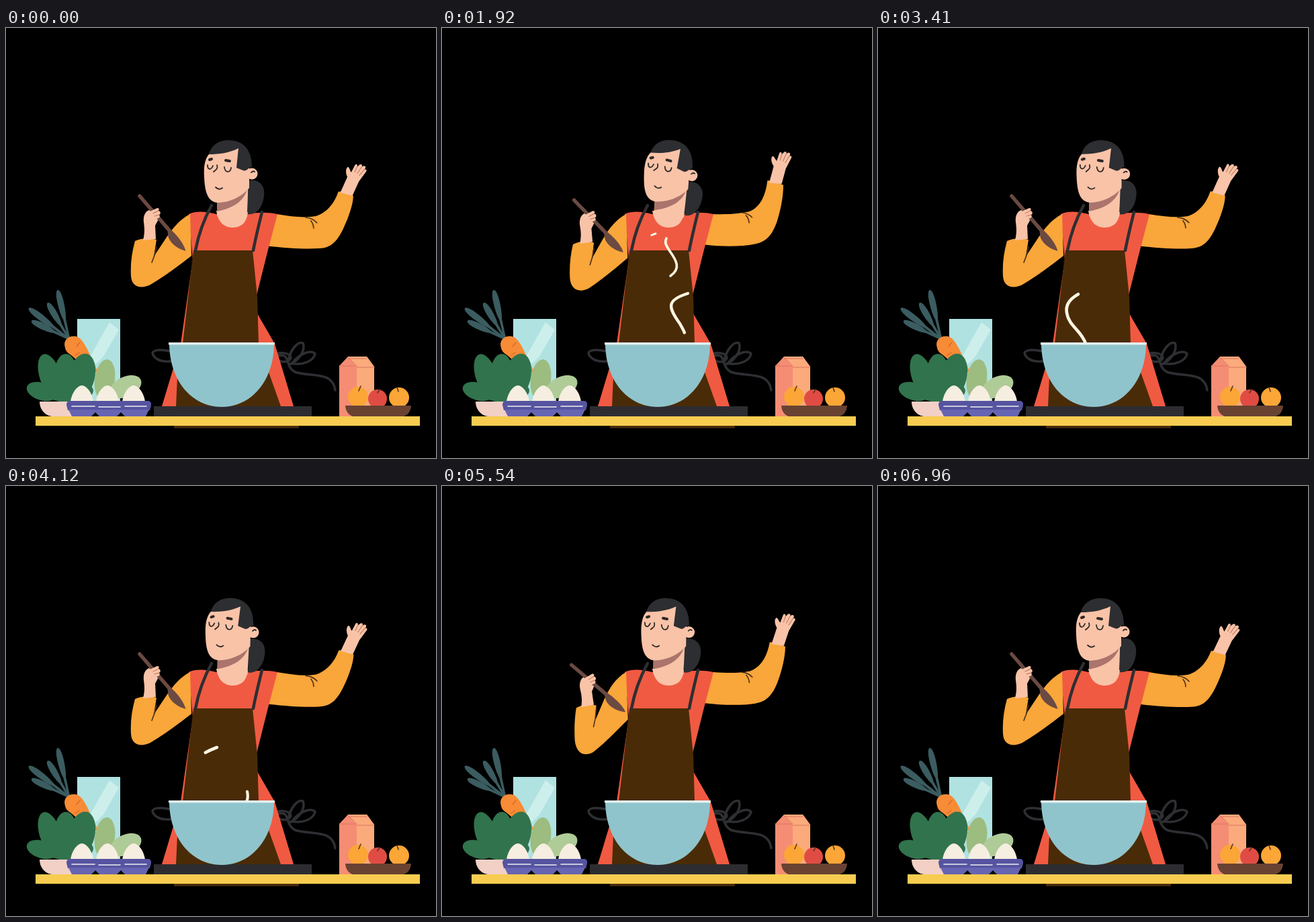
These frames come from a looping animation (640x640 px, 7030 ms). An HTML page:

```html
<!DOCTYPE html>
<html lang="en">
<head>
<meta charset="utf-8">
<title>Cooking</title>
<style>
  html, body { margin: 0; width: 100%; height: 100%; overflow: hidden; background: #000; }
  svg { display: block; width: 100vw; height: 100vh; }
  .line { fill: none; stroke-linecap: round; stroke-linejoin: round; }
</style>
</head>
<body>
<svg viewBox="0 0 640 640">
  <g id="produce">
    <path fill="#b0e2e1" d="M106 433H170V560H106Z"/>
    <path fill="#cdefeb" d="M154 438L168 449 145 489 134 500 124 491Z"/>
    <g id="fronds" fill="#3b5c60"></g>
    <path fill="#f78b36" d="M88 476C84 464 94 457 104 459C112 461 116 469 121 478L137 512 128 514 97 487C92 484 89 481 88 476Z"/>
    <path class="line" stroke="#d66a2a" stroke-width="1.2" d="M110 468L105 474M103 487L109 483M121 485L116 489"/>
    <ellipse fill="#9cbc80" cx="147" cy="523" rx="15" ry="30" transform="rotate(8 147 523)"/>
    <ellipse fill="#afcb97" cx="178" cy="534" rx="25" ry="15" transform="rotate(-25 178 534)"/>
    <g id="cabbage" fill="#31734c"></g>
    <path fill="#f2d0c6" d="M50 556H104V578H68C56 576 50 566 50 556Z"/>
    <g id="eggs" fill="#f6eee0"></g>
    <path fill="#5654a0" d="M94 555H212Q217 556 216 562L214 569H92L90 561Q90 556 94 555Z"/>
    <path fill="#6765b2" d="M93 568H213L208 578H177L171 572 165 578H139L133 572 127 578H98Z"/>
    <path class="line" stroke="#f0eef4" stroke-width="1.6" d="M98 563H132M138 564H170M177 563H209"/>
  </g>

  <g id="groceries">
    <path fill="#f48d74" d="M496 503L509 489H537L548 504V578H496Z"/>
    <path fill="#fbaa7c" d="M509 489H537L548 504V578H522V505Z"/>
    <path class="line" stroke="#dc7460" stroke-width="1" d="M496 503H522L509 490M522 505H548M510 492H537"/>
    <circle fill="#fba636" cx="524" cy="549" r="15"/>
    <circle fill="#e04c43" cx="553" cy="552" r="14"/>
    <circle fill="#fba636" cx="585" cy="550" r="15"/>
    <path class="line" stroke="#5b3526" stroke-width="1.6" d="M525 540L528 533M553 543L556 538M584 541L582 535"/>
    <path fill="#694232" d="M505 562H603Q602 576 589 579H519Q506 576 505 562Z"/>
  </g>

  <path class="line" stroke="#2e2f33" stroke-width="3.5" d="M244 481C226 477 215 480 219 487C224 495 234 497 245 496
    M398 487C410 480 424 485 424 491C420 500 404 498 400 489M420 495C424 478 434 466 442 469C446 480 436 495 423 500
    M425 500C438 482 456 479 460 485C458 495 442 503 425 499M405 488C424 483 414 503 430 512C455 520 486 510 490 539"/>

  <path id="armR" fill="#f9a63a"/>
  <path id="creaseR" class="line" stroke="#4a2f1a" stroke-width="1.6"/>
  <g id="handR" fill="#f9c3a8">
    <path d="M499 247L510 224C507 217 508 211 511 209C514 210 514 215 516 217L522 206C524 204 526 206 525 209L529 206C532 205 533 207 532 209L535 208C538 208 538 211 536 213C540 213 539 216 537 218L527 231 517 252Z"/>
    <path class="line" stroke="#b8755c" stroke-width="1" d="M525 209L521 217M532 209L525 219M536 213L528 222"/>
  </g>

  <g id="body">
    <path fill="#f05a42" d="M272 277C284 272 296 273 313 277H358C375 274 390 274 404 277L390 330 373 398 374 425 400 470 428 563H232L260 470 278 345Z"/>
    <path fill="#4a2b08" d="M279 331H367L374 400 376 470 409 563H253L255 520 263 470Z"/>
    <path class="line" stroke="#2e2e31" stroke-width="4.5" d="M306 264C295 284 287 305 282 331M381 274C377 290 372 310 368 331"/>
    <path fill="#f9c3a8" d="M313 272C316 290 325 297 338 297C351 296 358 290 360 274Z"/>
  </g>

  <g id="head">
    <path fill="#2d2e31" d="M358 228C377 222 386 236 384 249C383 265 373 279 360 277Z"/>
    <path fill="#f9c3a8" d="M314 245L361 210 359 280 345 291H330L314 279Z"/>
    <path fill="#ab746c" d="M314 260C334 258 349 248 360 237C356 256 340 268 314 273Z"/>
    <path fill="#f9c3a8" d="M303 187L350 178 362 206V238C352 250 334 260 314 260C301 258 296 246 295 222C294 206 296 194 303 187Z"/>
    <circle fill="#f9c3a8" cx="366" cy="217" r="8.5"/>
    <path fill="#2d2e31" d="M302 188C306 173 318 167 331 167C354 167 366 182 366 207C360 207 359 214 353 212L343 208 346 179C332 186 317 188 302 188Z"/>
    <path class="line" stroke="#2d2926" stroke-width="1.8" d="M300 204C300 211 305 212 308 205M325 207C326 216 334 216 335 208M314 204C316 210 312 211 309 214M312 237Q317 242 322 238M365 215Q368 212 370 214"/>
    <path class="line" stroke="#2d2926" stroke-width="4" d="M303 196L306 195M327 197L333 198"/>
  </g>

  <path id="armL" fill="#f9a63a"/>
  <path id="creaseL" class="line" stroke="#4a2f1a" stroke-width="1.6"/>
  <path id="palm" fill="#f9c3a8" d="M204 316C207 304 206 297 205 289C204 280 207 273 213 271L224 279 228 283 222 294 223 314Z"/>
  <path id="spoon" fill="#6b4a42" d="M0 -2.6Q-3 0 0 2.6L68 2.8C71 4 73 7 78 8.5C87 11 100 8 108 1.5C99 -3 86 -4 72 -2.8Z"/>
  <g id="fingers">
    <path fill="#f9c3a8" d="M212 274L225 268Q229 268 227 272L229 273Q231 276 228 278Q230 281 227 283L219 285Z"/>
    <path class="line" stroke="#b8755c" stroke-width="1" d="M227 272L219 276M228 278L221 280"/>
  </g>

  <g id="steam" class="line" stroke="#fdf6e2"></g>

  <path fill="#2d2d31" d="M220 563H455V578H220Z"/>
  <path fill="#90c4cc" d="M243 469H399C399 524 366 564 321 564C276 564 243 524 243 469Z"/>
  <path fill="#e3f2f0" d="M242 468H400V471.5H242Z"/>
  <path fill="#f8cc50" d="M44 578H616V592H44Z"/>
  <path fill="#4a2d0d" d="M250 592H436V595.5H250Z"/>
</svg>
<script>
const LOOP = 7030;
const $ = id => document.getElementById(id);

function add(parent, tag, attrs) {
  const el = document.createElementNS('http://www.w3.org/2000/svg', tag);
  for (const key in attrs) el.setAttribute(key, attrs[key]);
  return $(parent).appendChild(el);
}

// Carrot fronds grow from the crown, widening towards the tip.
for (const [x, y] of [[77, 390], [62, 409], [34, 417], [38, 436]]) {
  const angle = Math.atan2(y - 463, x - 94) * 180 / Math.PI;
  const n = Math.hypot(x - 94, y - 463);
  add('fronds', 'path', {
    transform: `translate(94 463) rotate(${angle})`,
    d: `M0 -1.5L${n * .4} -2C${n * .6} -6 ${n} -6 ${n} 0C${n} 6 ${n * .6} 6 ${n * .4} 2L0 1.5Z`
  });
}
for (const [cx, cy, rx, ry, turn] of [[66, 518, 16, 34, -18], [89, 516, 17, 31, 0],
  [112, 519, 20, 35, 14], [53, 541, 23, 13, 18], [93, 540, 37, 17, 0]])
  add('cabbage', 'ellipse', { cx, cy, rx, ry, transform: `rotate(${turn} ${cx} ${cy})` });
for (const x of [113, 151, 190])
  add('eggs', 'path', { d: `M${x} 532C${x + 10} 533 ${x + 17} 549 ${x + 17} 558H${x - 17}C${x - 17} 549 ${x - 10} 533 ${x} 532Z` });

const lerp = (a, b, u) => a + (b - a) * u;

// Eased value between [time, value] keys.
function ease(keys, t) {
  const i = Math.max(1, keys.findIndex(k => k[0] >= t));
  const [t0, a] = keys[i - 1], [t1, b] = keys[i];
  return lerp(a, b, (1 - Math.cos(Math.PI * (t - t0) / (t1 - t0))) / 2);
}

// Blends two paths of equal structure.
function blend([a, b], u) {
  const to = b.match(/-?[\d.]+/g);
  let i = 0;
  return a.replace(/-?[\d.]+/g, n => lerp(+n, +to[i++], u).toFixed(2));
}

const shapes = {
  armR: [
    'M403 277C425 281 445 284 462 281C478 276 490 262 496 246C504 245 513 249 518 252C518 264 511 283 502 301C492 320 484 328 466 329C445 330 420 328 391 325Z',
    'M403 277C425 277 440 275 455 272C472 266 480 248 482 223C490 223 500 227 506 230C506 245 504 264 498 285C491 307 482 316 466 320C445 325 415 325 391 322Z'],
  creaseR: ['M446 283Q457 284 463 291M454 288Q458 293 458 299', 'M446 273Q456 274 461 280M452 277Q456 281 457 288'],
  armL: [
    'M274 277C258 285 246 300 236 316L220 340 224 315C213 312 200 313 192 317C187 335 185 352 186 369C187 386 201 389 215 382C235 370 258 353 276 339Z',
    'M274 277C260 285 250 300 243 318L231 350 231 330C222 327 210 329 202 334C200 350 200 365 201 382C204 403 216 407 228 400C244 386 260 368 277 350Z'],
  creaseL: ['M224 326Q222 338 217 349', 'M231 334Q231 347 228 361']
};

const motion = {
  left: [[0, 0], [1000, 1], [2450, 0], [4450, 0], [6030, 1], [6990, 0], [LOOP, 0]],
  right: [[0, .1], [1070, .22], [2300, 1], [3500, .1], [4900, 0], [6050, 1], [6960, .02], [LOOP, .1]],
  head: [[0, 0], [1030, -4.5], [1930, 4.5], [3410, .5], [4900, 2.7], [6110, 0], [LOOP, 0]]
};

// Each wisp: path, width, then runs of [tip start, tip end, tail start, tail end].
const wisps = [
  ['M310 472C303 450 284 444 281 424C278 408 290 398 314 389', 4.6, [[350, 850, 780, 1500], [3050, 3480, 3500, 4250]]],
  ['M306 363C322 352 314 340 304 328C296 320 302 311 318 306', 3, [[700, 1120, 1100, 2000], [4450, 5080, 4900, 5500]]],
  ['M355 470C366 460 362 454 354 440C336 415 334 405 366 395', 4.4, [[1020, 1750, 1800, 2420]]],
  ['M340 369C356 358 349 346 339 332C333 323 331 319 334 313', 3.6, [[1450, 1920, 1930, 2500]]],
  ['M358 470C365 455 350 435 342 422C328 406 327 388 354 380', 4.2, [[4000, 4850, 4430, 5350]]]
].map(([d, width, runs]) => ({ runs, el: add('steam', 'path', { d, 'stroke-width': width, pathLength: 1 }) }));

function drawSteam(t) {
  const part = (a, b) => Math.min(1, Math.max(0, (t - a) / (b - a)));
  for (const { runs, el } of wisps) {
    const run = runs.find(r => t >= r[0] && t <= r[3]);
    el.style.display = run ? '' : 'none';
    if (!run) continue;
    const tip = part(run[0], run[1]), tail = part(run[2], run[3]);
    el.setAttribute('stroke-dasharray', `${Math.max(0, tip - tail)} 3`);
    el.setAttribute('stroke-dashoffset', -tail);
  }
}

function draw(t) {
  const left = ease(motion.left, t), right = ease(motion.right, t);
  for (const id in shapes) $(id).setAttribute('d', blend(shapes[id], id.endsWith('R') ? right : left));
  const move = (id, value) => $(id).setAttribute('transform', value);
  move('handR', `translate(${-14 * right} ${-22 * right}) rotate(${-12.5 * right} 508 250)`);
  const grip = `translate(${4 * left} ${16 * left}) rotate(${-7 * left} 213 315)`;
  move('palm', grip);
  move('fingers', grip);
  move('spoon', `translate(${lerp(198, 190, left)} ${lerp(249, 270, left)}) rotate(${lerp(49.2, 37.8, left)})`);
  move('head', `rotate(${ease(motion.head, t)} 338 293)`);
  drawSteam(t);
}

const start = performance.now();
function frame() {
  draw((performance.now() - start) % LOOP);
  requestAnimationFrame(frame);
}
frame();
</script>
</body>
</html>
```
